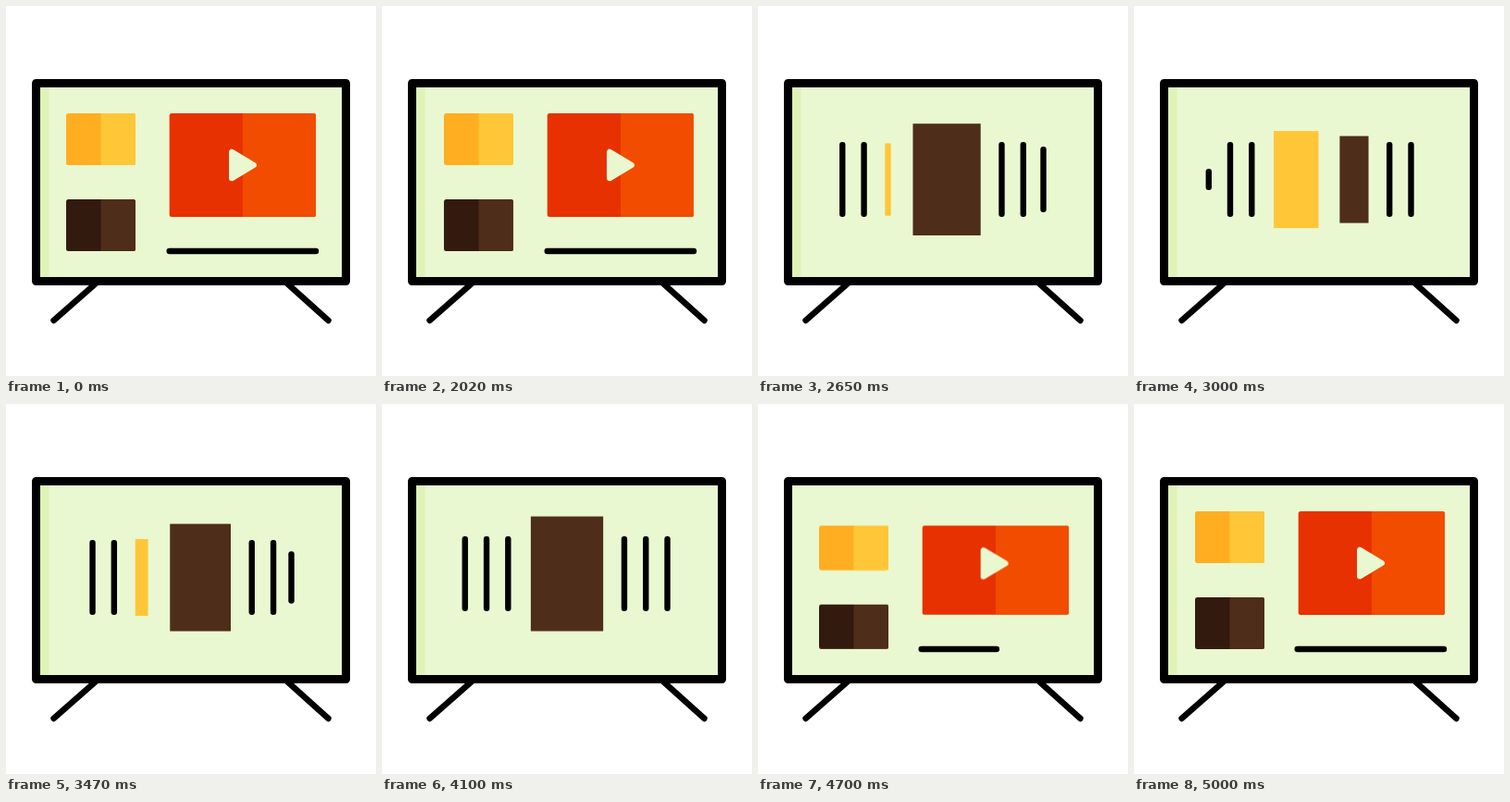
These frames come from a looping animation (400x400 px, 5020 ms). An HTML page without scripts:

```html
<!DOCTYPE html>
<html lang="en">
<head>
<meta charset="utf-8">
<title>Television screen</title>
<style>
/* --swipe runs from 0 (yellow card centred) to 1 (brown card centred) */
@property --swipe { syntax: '<number>'; inherits: true; initial-value: 0; }

html, body { margin: 0; width: 100%; height: 100%; overflow: hidden; background: #fff; }
svg { display: block; width: 100vw; height: 100vh; }
.anim, .carousel { animation: 5020ms linear infinite; }
.line { fill: none; stroke: #000; stroke-width: 6.4; stroke-linecap: round; }

.strip { animation-name: strip; }
.page { animation-name: leave; }
.blocks { animation-name: nudge; }
.top { transform-origin: 0 228px; animation-name: rise; }
.bottom { transform-origin: 0 265px; animation-name: rise; }
.play { transform-origin: 165px 241px; animation-name: pop; }
.progress { stroke-dasharray: 1 2; animation-name: draw; }

.carousel { animation-name: swipe, lift; }
.cards, .bars { transform-origin: 0 187.5px; }
.cards { animation-name: unfold-cards; }
.bars { animation-name: unfold-bars; }

.bar {
  --h: 81;
  x: calc(var(--x) * 1px - 3.2px);
  y: calc(187.5px - var(--h) * .5px);
  width: 6.4px;
  height: calc(var(--h) * 1px);
  rx: 3px;
}
.shift { transform: translateX(calc(var(--swipe) * -23.25px)); }
.shrink { --h: calc(81 - 150 * var(--swipe)); opacity: calc((.5 - var(--swipe)) * 1000); }
.grow { --h: calc(150 * var(--swipe) - 69); opacity: calc((var(--swipe) - .5) * 1000); }
.before { opacity: calc((.005 - var(--swipe)) * 1000); }
.after { opacity: calc((var(--swipe) - .995) * 1000); }

/* --d is the distance of a card from the centre */
.card {
  --w: calc(78.3 - 77 * var(--d));
  --h: calc(124 - 49 * var(--d));
  x: calc(200px + var(--reach) * var(--d) * 1px - var(--w) * .5px);
  y: calc(187.6px - var(--h) * .5px);
  width: calc(var(--w) * 1px);
  height: calc(var(--h) * 1px);
}
.yellow { --d: var(--swipe); --reach: -63.7; fill: #ffc637; }
.brown { --d: calc(1 - var(--swipe)); --reach: 62; fill: #4e2d1a; }

@keyframes strip {
  0%, 88.45% { opacity: 1; }
  88.46%, 99.2% { opacity: 0; }
  99.21%, 100% { opacity: 1; }
}
@keyframes leave {
  0%, 39.78% { transform: none; animation-timing-function: cubic-bezier(.333, 0, .667, .333); }
  45.82%, 88.6% { transform: translateX(310px); }
  88.61%, 100% { transform: none; }
}
@keyframes nudge {
  0%, 88.6% { transform: none; }
  88.61%, 100% { transform: translateX(1px); }
}
@keyframes rise {
  0%, 88.6% { transform: none; }
  88.61%, 88.65% { transform: scaleY(0); animation-timing-function: cubic-bezier(.333, 1, .667, 1); }
  99%, 100% { transform: none; }
}
@keyframes pop {
  0%, 88.6% { transform: none; }
  88.61%, 88.65% { transform: scale(0); animation-timing-function: cubic-bezier(.333, 1, .667, 1); }
  94.62%, 100% { transform: none; }
}
@keyframes draw {
  0%, 88.6% { stroke-dashoffset: 0; }
  88.61%, 88.65% { stroke-dashoffset: 1; animation-timing-function: cubic-bezier(.33, .1, .67, 1); }
  99%, 100% { stroke-dashoffset: 0; }
}
@keyframes swipe {
  0%, 48.86% { --swipe: 0; animation-timing-function: cubic-bezier(.33, .34, .67, .77); }
  53.19%, 57.33% { --swipe: 1; animation-timing-function: cubic-bezier(.33, .34, .67, .77); }
  61.65%, 65.7% { --swipe: 0; animation-timing-function: cubic-bezier(.33, .34, .67, .77); }
  70.02%, 100% { --swipe: 1; }
}
@keyframes lift {
  0%, 77.69% { transform: none; animation-timing-function: cubic-bezier(.333, 0, .667, 0); }
  91.63%, 100% { transform: translateY(-171.5px); }
}
@keyframes unfold-cards {
  0%, 42.83% { transform: scaleY(0); animation-timing-function: cubic-bezier(.333, .667, .667, 1); }
  48.41%, 100% { transform: none; }
}
@keyframes unfold-bars {
  0%, 42.83% { transform: scaleY(0); animation-timing-function: cubic-bezier(.333, .667, .667, 1); }
  48.71%, 100% { transform: none; }
}
</style>
</head>
<body>
<svg viewBox="0 0 400 400">
  <clipPath id="screen"><path d="M36 87H364V294H36z"/></clipPath>

  <path class="line" d="M51.5 340 97 300M348.5 340 304 300"/>
  <path d="M32 83H368V298H32z" fill="#e9f8d0"/>
  <path class="anim strip" d="M36 87H46.5V294H36z" fill="#dff3b8"/>

  <g clip-path="url(#screen)">
    <g class="anim page">
      <g class="anim blocks">
        <g class="anim top">
          <rect x="65" y="116" width="75" height="56" rx="2.5" fill="#ffae22"/>
          <path d="M102.5 116H137.5a2.5 2.5 0 0 1 2.5 2.5V169.5a2.5 2.5 0 0 1-2.5 2.5H102.5z" fill="#ffc637"/>
          <rect x="176.7" y="116" width="158.3" height="112" rx="2.5" fill="#e83100"/>
          <path d="M256 116H332.5a2.5 2.5 0 0 1 2.5 2.5V225.5a2.5 2.5 0 0 1-2.5 2.5H256z" fill="#f24c00"/>
        </g>
        <g class="anim bottom">
          <rect x="65" y="209" width="75" height="56" rx="2.5" fill="#331a0f"/>
          <path d="M102.5 209H137.5a2.5 2.5 0 0 1 2.5 2.5V262.5a2.5 2.5 0 0 1-2.5 2.5H102.5z" fill="#4e2d1a"/>
        </g>
      </g>
      <path class="anim play" d="M244 157.7V186.3L268 172z" fill="#e9f8d0" stroke="#e9f8d0" stroke-width="6" stroke-linejoin="round"/>
      <path class="line anim progress" d="M176.7 265H335" pathLength="1"/>
    </g>

    <g class="carousel">
      <g class="anim cards">
        <rect class="card yellow"/>
        <rect class="card brown"/>
      </g>
      <g class="anim bars">
        <rect class="bar shift shrink" style="--x:89.8"/>
        <rect class="bar shift" style="--x:113"/>
        <rect class="bar shift" style="--x:136.3"/>
        <rect class="bar after" style="--x:136.3"/>
        <rect class="bar before" style="--x:262"/>
        <rect class="bar shift" style="--x:285.2"/>
        <rect class="bar shift" style="--x:308.5"/>
        <rect class="bar grow" style="--x:308.5"/>
      </g>
    </g>
  </g>

  <rect x="32.5" y="83.5" width="335" height="214" fill="none" stroke="#000" stroke-width="9" stroke-linejoin="round"/>
</svg>
</body>
</html>
```
